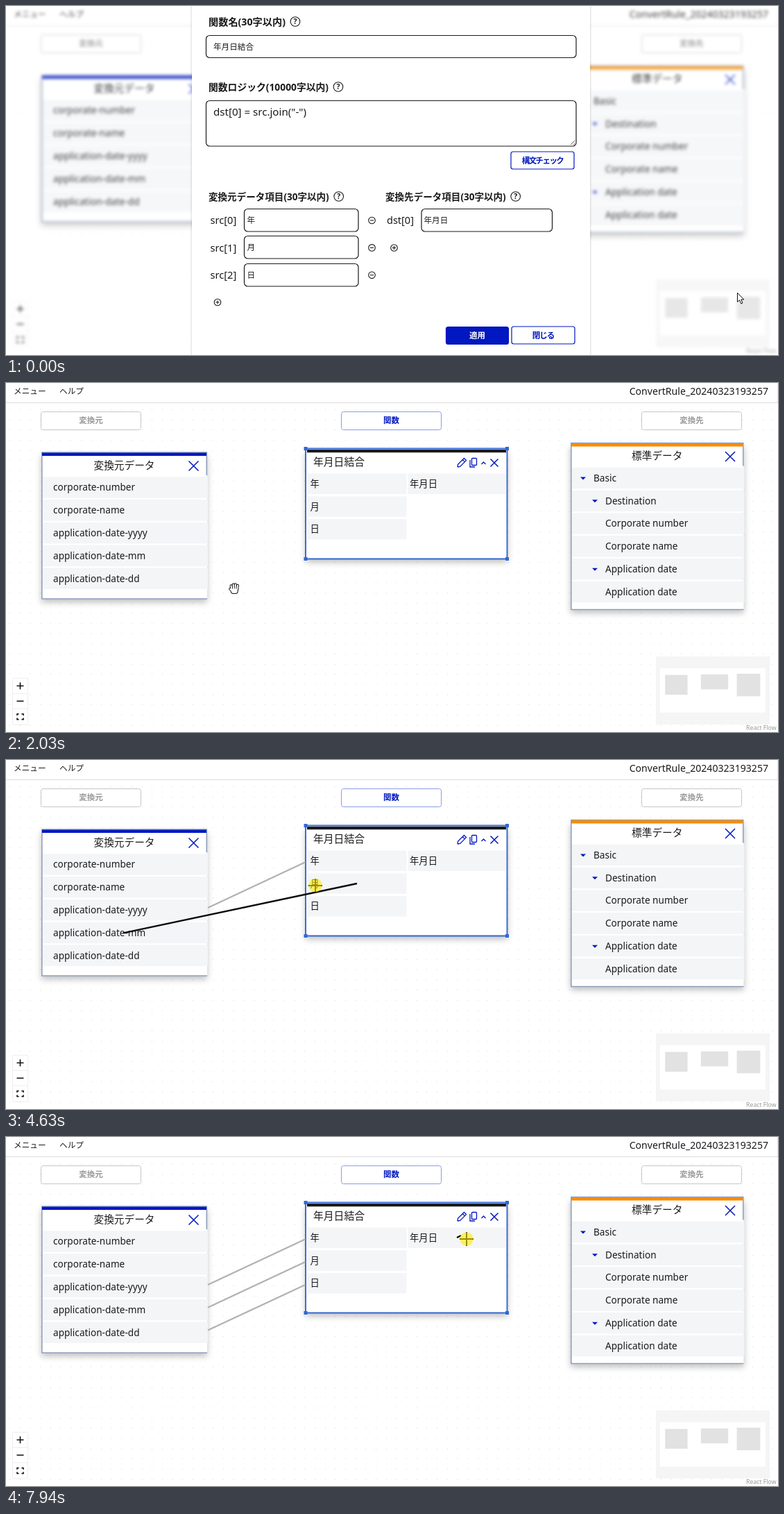
These frames come from a looping animation (1113 px wide and 503 px high, 8000 ms). An HTML page with a canvas:

```html
<!DOCTYPE html>
<html lang="ja">
<head>
<meta charset="utf-8">
<title>Convert rule editor</title>
<style>
html, body { margin: 0; width: 100%; height: 100%; overflow: hidden; background: #fff; }
canvas { display: block; }
</style>
</head>
<body>
<canvas id="stage" width="1113" height="503"></canvas>
<script>
const W = 1113, H = 503, LOOP = 8000;
const INK = '#1a1a1c', BLUE = '#0017c1', SELECT = '#3367d1', ROW = '#f4f5f7', SLATE = '#8fa0bd';
const PITCH = 32.8; // distance between node rows
const FONT = '"Noto Sans", "Noto Sans CJK JP", "Noto Sans CJK", sans-serif';
const stage = document.getElementById('stage').getContext('2d');
let c = stage;

const source = {
  x: 51, y: 100, w: 239, h: 211, bar: BLUE, title: '変換元データ', indent: 17,
  rows: ['corporate-number', 'corporate-name', 'application-date-yyyy', 'application-date-mm', 'application-date-dd']
};
const target = {
  x: 814, y: 86.5, w: 249.5, h: 240, bar: '#fb8b00', title: '標準データ', indent: 50,
  rows: ['▾Basic', '▾Destination', 'Corporate number', 'Corporate name', '▾Application date', 'Application date']
};
const joiner = { x: 432, y: 94.5, w: 290.5, h: 159, inputs: ['年', '月', '日'] };

function layer(draw) {
  const el = document.createElement('canvas');
  el.width = W;
  el.height = H;
  c = el.getContext('2d');
  draw();
  c = stage;
  return el;
}

// y is the optical middle of the text
function text(s, x, y, size, color = INK, align = 'left', weight = 400, spacing = 0) {
  c.font = `${weight} ${size}px ${FONT}`;
  c.letterSpacing = spacing + 'px';
  c.textAlign = align;
  c.fillStyle = color;
  c.fillText(s, x, y + size * 0.36);
}

function rect(x, y, w, h, color) {
  c.fillStyle = color;
  c.fillRect(x, y, w, h);
}

function box(x, y, w, h, r, stroke, fill, lw = 1) {
  c.beginPath();
  c.roundRect(x + 0.5, y + 0.5, w - 1, h - 1, r);
  if (fill) { c.fillStyle = fill; c.fill(); }
  c.strokeStyle = stroke;
  c.lineWidth = lw;
  c.stroke();
}

function lines(color, width, ...paths) {
  c.strokeStyle = color;
  c.lineWidth = width;
  c.beginPath();
  for (const p of paths)
    for (let i = 0; i < p.length; i += 2) i ? c.lineTo(p[i], p[i + 1]) : c.moveTo(p[i], p[i + 1]);
  c.stroke();
}

function disc(x, y, r, color) {
  c.fillStyle = color;
  c.beginPath();
  c.arc(x, y, r, 0, 7);
  c.fill();
}

function ring(x, y, r) {
  c.strokeStyle = INK;
  c.lineWidth = 1.1;
  c.beginPath();
  c.arc(x, y, r, 0, 7);
  c.stroke();
}

const dash = (x, y, r, color, w) => lines(color, w, [x - r, y, x + r, y]);
const plus = (x, y, r, color, w) => lines(color, w, [x - r, y, x + r, y], [x, y - r, x, y + r]);
const cross = (x, y, r) => lines(BLUE, 1.5, [x - r, y - r, x + r, y + r], [x - r, y + r, x + r, y - r]);

function shadowed(x, y, w, h, blur, drop) {
  c.save();
  c.shadowColor = 'rgba(0,0,0,.25)';
  c.shadowBlur = blur;
  c.shadowOffsetY = drop;
  rect(x, y, w, h, '#fff');
  c.restore();
}

function dataNode({ x, y, w, h, bar, title, rows, indent }) {
  const right = x + w;
  shadowed(x, y, w, h, 9, 5);
  lines(SLATE, 1.6, [right - 0.7, y + 33, right - 0.7, y, x + 0.8, y, x + 0.8, y + h, right, y + h]);
  rect(x + 1, y + 0.5, w - 2, 4.5, bar);
  text(title, x + w / 2, y + 18.3, 14.67, INK, 'center');
  cross(right - 19.5, y + 19.5, 7);
  rows.forEach((s, i) => {
    const top = y + 35.2 + i * PITCH, mid = top + 15.3;
    const open = s.startsWith('▾');
    const left = x + (i || !open ? indent : indent - 17);
    rect(x + 2, top, w - 1, 30.6, ROW);
    text(s.replace('▾', ''), left, mid, 13.6);
    if (!open) return;
    c.fillStyle = BLUE;
    c.beginPath();
    for (const [dx, dy] of [[-4, -1.5], [4, -1.5], [0, 2.5]]) c.lineTo(left - 15 + dx, mid + dy);
    c.fill();
  });
}

function pencil(x, y) {
  c.save();
  c.translate(x, y);
  c.rotate(-Math.PI / 4);
  lines(BLUE, 1.3, [-8.5, 0, -5.5, -2.2, 7, -2.2, 7, 2.2, -5.5, 2.2, -8.5, 0], [4, -2, 4, 2]);
  c.restore();
}

function joinNode({ x, y, w, h, inputs }) {
  shadowed(x, y, w, h, 9, 5);
  lines(SELECT, 1.9, [x, y, x + w, y, x + w, y + h, x, y + h, x, y]);
  rect(x + 2, y + 1.5, w - 3.5, 4.2, INK);
  for (const px of [x, x + w]) for (const py of [y, y + h]) rect(px - 2.5, py - 2.5, 5, 5, SELECT);
  text('年月日結合', x + 11, y + 19.5, 14.8);
  const mid = y + 20.5;
  pencil(x + 225, mid);
  lines(BLUE, 1.3, [x + 237, mid - 4, x + 237, mid + 6, x + 244, mid + 6],
    [x + 253.5, mid + 2, x + 256.5, mid - 1, x + 259.5, mid + 2]);
  box(x + 239, mid - 7, 8, 11, 1, BLUE, null, 1.3);
  cross(x + 272, mid, 5.5);
  inputs.forEach((s, i) => {
    rect(x + 2, y + 36 + i * PITCH, 143.5, 29.5, ROW);
    text(s, x + 6.5, y + 50.5 + i * PITCH, 13.33);
  });
  rect(x + 147.5, y + 36, 141.5, 29.5, ROW);
  text(inputs.join(''), x + 150, y + 50.5, 13.33);
}

function controls() {
  box(9, 425, 23, 68, 1, '#eee', '#fff');
  rect(9, 447, 23, 1, '#eee');
  rect(9, 469, 23, 1, '#eee');
  plus(20.5, 436.5, 5, '#111', 1.6);
  dash(20.5, 458.5, 5, '#111', 1.6);
  for (const sx of [-1, 1]) for (const sy of [-1, 1]) {
    const x = 20.5 + sx * 4.5, y = 481 + sy * 4;
    lines('#111', 1.6, [x, y - sy * 2.2, x, y, x - sx * 2.6, y]);
  }
}

function minimap() {
  const k = 0.1355;
  rect(937, 394, 164, 98, '#f5f5f5');
  rect(943, 411, 152, 64, '#fff');
  for (const n of [source, joiner, target])
    rect(943.3 + n.x * k, 407.2 + n.y * k, n.w * k, n.h * k, '#e2e2e2');
  rect(1064, 492, 49, 11, '#fff');
  text('React Flow', 1110.5, 497, 8.7, '#999', 'right');
}

function drawScene() {
  rect(0, 0, W, H, '#fff');
  for (let y = 38; y < H; y += 14.67)
    for (let x = 5; x < W; x += 14.67) rect(Math.round(x), Math.round(y), 1, 1, '#dcdce0');
  rect(0, 0, W, 28, '#fff');
  rect(0, 28, W, 1, '#dcdcde');
  rect(1112, 0, 1, 28, '#e6e6e6');
  text('メニュー', 11, 11.5, 11.67);
  text('ヘルプ', 77, 11.5, 11.67);
  text('ConvertRule_20240323193257', 1099, 12, 14.1, INK, 'right');
  ['変換元', '関数', '変換先'].forEach((s, i) => {
    const x = 50 + i * 433, on = i === 1;
    box(x, 41, 145, 27, 3, on ? '#8a9be4' : '#c6c6c8', '#fff');
    text(s, x + 72.5, 54, 11.5, on ? BLUE : '#999', 'center', 700);
  });
  dataNode(source);
  dataNode(target);
  joinNode(joiner);
  controls();
  minimap();
}

function stepper(x, y, add) {
  ring(x, y, 4.8);
  (add ? plus : dash)(x, y, 2.6, INK, 1.1);
}

function heading(s, x, y, size) {
  text(s, x, y, size, INK, 'left', 700);
  const helpX = x + c.measureText(s).width + 14;
  ring(helpX, y - 0.5, 6.8);
  text('?', helpX, y - 0.5, 10.5, INK, 'center', 600);
}

function field(x, y, w, h, s, dx, size = 11.6, ty = y + h / 2) {
  box(x, y, w, h, 5, INK, '#fff', 1.2);
  text(s, x + dx, ty, size);
}

function button(s, x, y, w, h, spacing, solid) {
  box(x, y, w, h, 3, BLUE, solid ? BLUE : '#fff', 1.2);
  text(s, x + w / 2, y + h / 2, 11.5, solid ? '#fff' : BLUE, 'center', 700, spacing);
}

function drawModal() {
  rect(0, 0, W, H, '#fff');
  c.filter = 'blur(2.2px)';
  c.drawImage(scene, 0, 0);
  c.filter = 'none';
  rect(0, 0, W, H, 'rgba(253,253,253,.18)');
  shadowed(268, -10, 574, H + 20, 3, 0);

  heading('関数名(30字以内)', 292, 23, 14.2);
  field(288, 42, 534.5, 33, '年月日結合', 11);
  heading('関数ロジック(10000字以内)', 292, 117, 13.8);
  field(288, 136, 534.5, 66.5, 'dst[0] = src.join("-")', 11, 15.1, 153);
  lines('#666', 1, [814, 200, 820, 194], [818, 200, 820, 198]);
  button('構文チェック', 727.5, 209.5, 92, 26, -1.6);

  heading('変換元データ項目(30字以内)', 292, 275, 13.55);
  heading('変換先データ項目(30字以内)', 547, 275, 13.55);
  joiner.inputs.forEach((s, i) => {
    const y = 309 + i * 39.4;
    text(`src[${i}]`, 294.5, y, 14.6);
    field(343, Math.round(y - 17), 165.5, 33.5, s, 4.5);
    stepper(527.5, y, false);
  });
  stepper(305, 427, true);
  text('dst[0]', 549, 309, 14.5);
  field(598.5, 292, 189.5, 33.5, '年月日', 4);
  stepper(559.5, 348.5, true);
  button('適用', 634, 462, 91, 26, 0, true);
  button('閉じる', 728.5, 461.5, 92, 26, -1);
}

// One entry per connected row: hover, press, drag and release times
const links = [
  { x: 215, reach: [1730, 2310], press: 2650, drag: [2715, 3100], release: 3460 },
  { x: 208, reach: [3460, 3820], press: 4230, drag: [4390, 4630], release: 5100 },
  { x: 243, reach: [5290, 5630], press: 5850, drag: [6090, 6480], release: 6940 }
];
const STEP = 66; // the pointer is sampled about every 66 ms
const keys = [{ t: 0, x: 1054, y: 413, link: -1 }];

function glide([t0, t1], x, y, link = -1) {
  const from = keys[keys.length - 1];
  const n = Math.round((t1 - t0) / STEP) + 1;
  for (let i = 1; i <= n; i++) {
    const k = 1 - (1 - i / n) ** 2;
    const t = t0 + (t1 - t0) * (i - 1) / Math.max(1, n - 1);
    keys.push({ t, x: from.x + (x - from.x) * k, y: from.y + (y - from.y) * k ** 1.3, link });
  }
}
const jump = (t, x, y, link) => glide([t, t], x, y, link);

glide([280, 1050], 677, 479);
jump(1270, 666, 472);
jump(1400, 672, 470);
links.forEach(({ x, reach, press, drag, release }, i) => {
  const y = 217 + i * 32.6, dropY = 148 + i * 32.5;
  glide(reach, x, y);
  jump(press, x, y, i);
  glide(drag, 446, dropY, i);
  jump(release, 446, dropY);
});
glide([6940, 7250], 697, 136);
glide([7320, 7530], 656, 142);
jump(7750, 656, 142, links.length);
jump(7940, 664, 147, links.length);

const scene = layer(drawScene);
const modal = layer(drawModal);

function arrow(x, y) {
  c.beginPath();
  for (const [dx, dy] of [[0.5, 0.5], [0.5, 13.5], [3.5, 10.8], [5.8, 16], [8, 15], [5.8, 10], [9.8, 10]])
    c.lineTo(x + dx, y + dy);
  c.closePath();
  c.fillStyle = '#fff';
  c.fill();
  c.strokeStyle = '#111';
  c.lineWidth = 1;
  c.stroke();
}

// Four fingers, a thumb and a palm: a wide dark pass, then a narrow white one
function hand(x, y, tipY, spread) {
  c.save();
  c.translate(x, y);
  c.lineCap = c.lineJoin = 'round';
  const fingers = [0, 1, 2, 3].map(i => {
    const base = (i - 1.5) * 2.6;
    return [base * (1 + spread), tipY(i), base, 2];
  });
  for (const [color, w] of [['#111', 4], ['#fff', 2]]) {
    lines(color, w, ...fingers, [-6, 1, -3, 4]);
    box(-4, 1, 8, 5.5, 2, color, color, w);
  }
  c.restore();
}

const openHand = (x, y) => hand(x, y, i => 0.8 * (i - 1.6) ** 2 - 5.7, 0.2);
const pointer = (x, y) => hand(x + 4, y + 12, i => i ? i * 0.4 - 4 : -11, 0);

function drawCursor(t, { x, y, link }) {
  const pressed = link >= 0 || (t >= 1050 && t < 1270);
  const onNode = [source, joiner].some(n => x > n.x && x < n.x + n.w && y > n.y && y < n.y + n.h);
  if (t < 1270) (x < 724 && y > 462 ? pointer : arrow)(x, y);
  else if (onNode) plus(Math.round(x), Math.round(y), 10, '#000', 2);
  else openHand(x, y);
  if (pressed) disc(x, y, 9.8, 'rgba(255,235,0,.6)');
}

// The dragged line trails the pointer by one sample and snaps to an input row
function drawLink(link, prev) {
  const out = link === links.length;
  const start = out ? [650, 145] : [169, 216.5 + link * PITCH];
  const end = !out && prev.x > joiner.x ? [506, 145 + link * 33] : [prev.x, prev.y];
  lines('#0c0c0c', 2.4, [...start, ...end]);
}

function frame() {
  const t = performance.now() % LOOP;
  c.drawImage(scene, 0, 0);
  c.globalAlpha = Math.max(0, Math.min(1, Math.ceil((1270 - t) / 80) / 3));
  c.drawImage(modal, 0, 0);
  c.globalAlpha = 1;
  links.forEach(({ release }, i) => {
    const y = i * PITCH;
    if (t >= release) lines('#b1b1b1', 2.2, [291, 213 + y, 431.5, 147.3 + y]);
  });
  const i = keys.findLastIndex(k => k.t <= t);
  if (keys[i].link >= 0) drawLink(keys[i].link, keys[i - 1]);
  drawCursor(t, keys[i]);
  requestAnimationFrame(frame);
}
frame();
</script>
</body>
</html>
```
